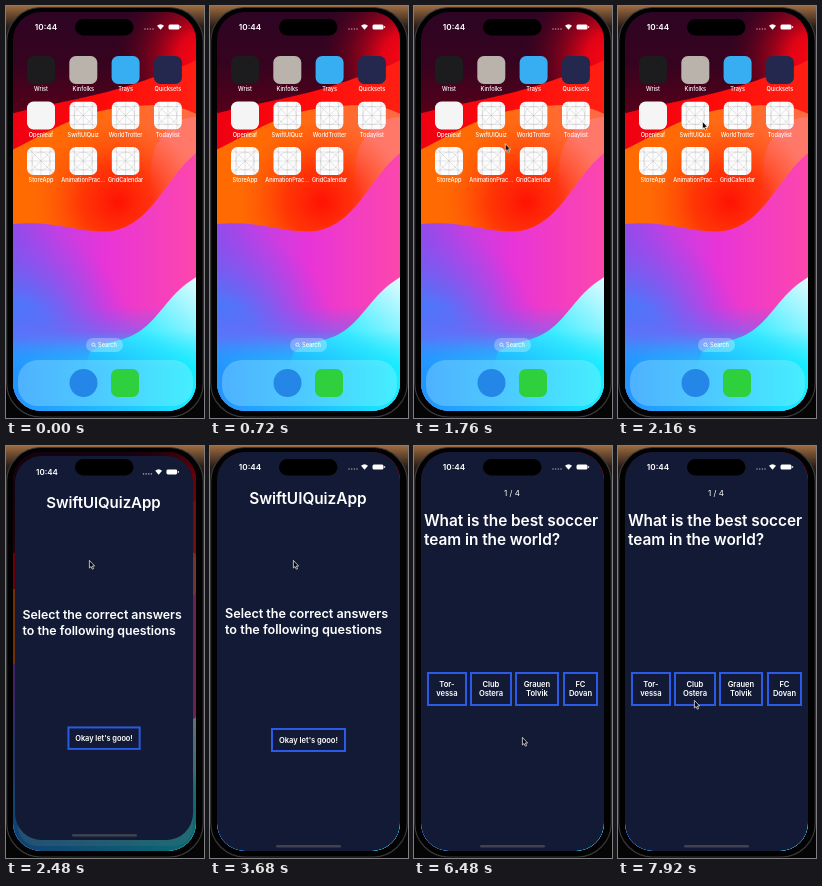
Write an HTML page that moves like this. It is 198 px wide and 412 px high and loops after 8 s.

```html
<!DOCTYPE html>
<html lang="en">
<head>
<meta charset="utf-8">
<title>Quiz app demo</title>
<style>
  html, body { margin: 0; width: 100%; height: 100%; overflow: hidden; background: #050506; }
  .stage { position: relative; width: 198px; height: 412px; overflow: hidden; }
  .stage svg, .stage div { position: absolute; left: 0; top: 0; width: 198px; height: 412px; }
  .stage svg { display: block; overflow: visible; }
  text { font-family: Inter, "Open Sans", sans-serif; fill: #fff; }
  .mid { text-anchor: middle; }
  .label { font-size: 5.6px; font-weight: 500; text-anchor: middle; }
  .time { font-size: 8.2px; font-weight: 600; text-anchor: middle; }
  .title { font-size: 15.4px; font-weight: 600; }
  .lead { font-size: 12.7px; font-weight: 600; }
  .action { font-size: 7.6px; font-weight: 600; text-anchor: middle; }
  .box { fill: none; stroke: #2b5be6; stroke-width: 2; }

  .screen { clip-path: inset(6px 8px 7px 7px round 28px); }
  .dim, .app, .content, .bar, .intro, .question, .cursor { animation: 8s linear infinite; }
  .dim { background: #000; opacity: 0; animation-name: dim; }
  .app { background: #131a35; animation-name: open; }
  .content { transform-origin: 0 0; animation-name: settle; }
  .bar { animation-name: bar; }
  .intro { animation-name: leave; }
  .question { background: #131a35; animation-name: enter; }
  .stage .cursor { width: 7px; height: 11px; animation-name: point; }

  @keyframes dim {
    0%, 28% { opacity: 0; }
    30%, 31.5% { opacity: .55; }
    33%, 100% { opacity: 1; }
  }
  @keyframes open {
    0%, 27.99% { opacity: 0; clip-path: inset(95px 107px 289px 63px round 7px); }
    28% { opacity: .2; clip-path: inset(95px 107px 289px 63px round 7px); }
    29% { opacity: 1; clip-path: inset(62px 63px 170px 38px round 18px); }
    30% { opacity: 1; clip-path: inset(26px 25px 62px 17px round 25px); }
    31% { opacity: 1; clip-path: inset(10px 11px 18px 9px round 27px); }
    32% { opacity: 1; clip-path: inset(7px 9px 9px 7.5px round 28px); }
    33%, 100% { opacity: 1; clip-path: inset(6px 8px 7px 7px round 28px); }
  }
  @keyframes settle {
    0%, 28% { transform: translate(62px, 94px) scale(.15); }
    29% { transform: translate(35px, 58px) scale(.51); }
    30% { transform: translate(13px, 21px) scale(.84); }
    31% { transform: translate(2px, 5.5px) scale(.975); }
    32% { transform: translate(.5px, 1.5px) scale(.994); }
    33%, 100% { transform: none; }
  }
  @keyframes bar {
    0%, 28% { transform: translateY(-220px); }
    30% { transform: translateY(-55px); }
    31% { transform: translateY(-11px); }
    32% { transform: translateY(-3px); }
    33%, 100% { transform: none; }
  }
  @keyframes leave {
    0%, 74% { transform: none; animation-timing-function: cubic-bezier(.2, .8, .3, 1); }
    80%, 100% { transform: translateX(-60px); }
  }
  @keyframes enter {
    0%, 74% { transform: translateX(198px); animation-timing-function: cubic-bezier(.2, .8, .3, 1); }
    80%, 100% { transform: none; }
  }
  @keyframes point {
    0%, 12% { transform: translate(200px, 235px); animation-timing-function: ease-out; }
    17%, 19% { transform: translate(95px, 151px); animation-timing-function: ease-in-out; }
    26%, 30% { transform: translate(84px, 115px); }
    31%, 52% { transform: translate(83px, 114px); animation-timing-function: ease-in-out; }
    63%, 65% { transform: translate(120px, 262px); animation-timing-function: ease-in-out; }
    72%, 84% { transform: translate(108px, 291px); animation-timing-function: ease-in-out; }
    97%, 100% { transform: translate(76px, 254px); }
  }
</style>
</head>
<body>
<div class="stage">
  <svg viewBox="0 0 198 412">
    <defs>
      <linearGradient id="desk" x2="0" y2="1">
        <stop offset="0" stop-color="#9a6a40"/><stop offset=".05" stop-color="#2a1e18"/><stop offset=".12" stop-color="#050506"/>
      </linearGradient>
      <linearGradient id="night" x2="0" y2="1">
        <stop offset="0" stop-color="#2c0524"/><stop offset=".14" stop-color="#36031f"/><stop offset=".28" stop-color="#5c0018"/>
      </linearGradient>
      <radialGradient id="glow" gradientUnits="userSpaceOnUse" cx="198" cy="52" r="88">
        <stop offset="0" stop-color="#ff0612"/><stop offset=".3" stop-color="#e00316"/><stop offset="1" stop-color="#60001c" stop-opacity="0"/>
      </radialGradient>
      <linearGradient id="red">
        <stop offset="0" stop-color="#ee0012"/><stop offset=".5" stop-color="#ff0a0a"/><stop offset=".8" stop-color="#ff1a10"/><stop offset="1" stop-color="#ff2012"/>
      </linearGradient>
      <linearGradient id="orange">
        <stop offset="0" stop-color="#ff6a00"/><stop offset=".4" stop-color="#ff6a08"/><stop offset=".7" stop-color="#ff6a2c"/><stop offset="1" stop-color="#ff6a4c"/>
      </linearGradient>
      <radialGradient id="ember" gradientUnits="userSpaceOnUse" cx="112" cy="196" r="82">
        <stop offset="0" stop-color="#ff1204"/><stop offset=".45" stop-color="#ff2a04" stop-opacity=".8"/><stop offset="1" stop-color="#ff4a04" stop-opacity="0"/>
      </radialGradient>
      <linearGradient id="coral" x1="0" y1="1" x2="1" y2="0">
        <stop offset="0" stop-color="#ff3a30"/><stop offset=".5" stop-color="#ff7468"/><stop offset="1" stop-color="#ff7a68"/>
      </linearGradient>
      <linearGradient id="violet">
        <stop offset="0" stop-color="#8c4cec"/><stop offset=".25" stop-color="#c040e4"/><stop offset=".5" stop-color="#e834d8"/><stop offset="1" stop-color="#ff48a8"/>
      </linearGradient>
      <radialGradient id="blue" gradientUnits="userSpaceOnUse" cx="0" cy="345" r="130">
        <stop offset="0" stop-color="#2a86ff"/><stop offset=".4" stop-color="#4a78fa" stop-opacity=".9"/><stop offset="1" stop-color="#8050f0" stop-opacity="0"/>
      </radialGradient>
      <linearGradient id="shore" gradientUnits="userSpaceOnUse" x1="0" y1="300" x2="0" y2="356">
        <stop offset="0" stop-color="#7a5cf4" stop-opacity="0"/><stop offset=".6" stop-color="#6a70f8" stop-opacity=".8"/><stop offset="1" stop-color="#2aa6ff"/>
      </linearGradient>
      <linearGradient id="cyan" gradientUnits="userSpaceOnUse" x1="100" y1="375" x2="190" y2="272">
        <stop offset="0" stop-color="#22c8ff"/><stop offset=".45" stop-color="#3cecff"/><stop offset="1" stop-color="#e0fcff"/>
      </linearGradient>
      <linearGradient id="sea">
        <stop offset="0" stop-color="#2490ff"/><stop offset=".5" stop-color="#20bcff"/><stop offset="1" stop-color="#14f2ff"/>
      </linearGradient>
      <linearGradient id="seaFade" gradientUnits="userSpaceOnUse" x1="0" y1="325" x2="0" y2="362">
        <stop offset="0" stop-color="#000"/><stop offset="1" stop-color="#fff"/>
      </linearGradient>
      <mask id="seaMask"><rect y="320" width="198" height="92" fill="url(#seaFade)"/></mask>
      <symbol id="status" viewBox="0 0 198 412">
        <text class="time" x="40" y="24">10:44</text>
        <g fill="#fff">
          <g opacity=".55"><circle cx="139" cy="23" r=".8"/><circle cx="141.7" cy="23" r=".8"/><circle cx="144.4" cy="23" r=".8"/><circle cx="147" cy="23" r=".8"/></g>
          <path d="M151 19.8Q154.5 16.6 158 19.8L154.5 23.8Z"/>
          <rect x="162.5" y="18.6" width="11" height="5" rx="1.5"/>
          <rect x="174.2" y="20.1" width=".9" height="2" rx=".4"/>
        </g>
      </symbol>
      <symbol id="template" viewBox="0 0 28 28">
        <rect width="28" height="28" rx="6.5" fill="#fcfcfc"/>
        <g fill="none" stroke="#a6a6ae" stroke-width=".4">
          <path d="M5 0V28M14 0V28M23 0V28M0 5H28M0 14H28M0 23H28" opacity=".7"/>
          <path d="M2 2L26 26M26 2L2 26" opacity=".8"/>
          <circle cx="14" cy="14" r="9" opacity=".7"/>
        </g>
      </symbol>
    </defs>
    <rect width="198" height="412" fill="url(#desk)"/>
    <rect x=".7" y="1.5" width="196.6" height="409.5" rx="34" fill="#020203" stroke="#38383b" stroke-width="1.2"/>
  </svg>

  <div class="screen">
    <svg viewBox="0 0 198 412">
      <rect width="198" height="412" fill="url(#night)"/>
      <rect width="198" height="180" fill="url(#glow)"/>
      <path d="M0 109C45 97 90 91 128 78S180 60 198 50V260H0Z" fill="url(#red)"/>
      <path d="M0 147C40 128 70 106 118 101S180 102 198 112V260H0Z" fill="url(#orange)"/>
      <path d="M130 214C152 190 140 160 150 140S175 108 198 112V260H120Z" fill="url(#coral)"/>
      <path d="M0 147C40 128 70 106 118 101S180 102 198 112V260H0Z" fill="url(#ember)"/>
      <path d="M0 219C48 212 70 228 106 225C150 217 160 166 198 141V412H0Z" fill="url(#violet)"/>
      <path d="M0 219C48 212 70 228 106 225C150 217 160 166 198 141V412H0Z" fill="url(#blue)"/>
      <rect y="300" width="198" height="112" fill="url(#shore)"/>
      <path d="M198 267C166 282 158 306 138 322S104 332 84 346L60 412H198Z" fill="url(#cyan)"/>
      <rect y="320" width="198" height="92" fill="url(#sea)" mask="url(#seaMask)"/>
      <use href="#status"/>
      <g id="icons"></g>
      <rect x="80" y="332" width="37" height="14" rx="7" fill="#fff" fill-opacity=".28"/>
      <g fill="none" stroke="#fff" stroke-width=".7"><circle cx="87.4" cy="338.6" r="1.6"/><path d="M88.6 339.8L90 341.2"/></g>
      <text class="label" x="101.5" y="341">Search</text>
      <rect x="12" y="354" width="175" height="46" rx="20" fill="#b4f0ff" fill-opacity=".3"/>
      <circle cx="77.5" cy="377" r="14" fill="#2487e8"/>
      <rect x="105" y="363" width="28" height="28" rx="6.5" fill="#2fd03e"/>
    </svg>
    <div class="dim"></div>
    <div class="app">
      <div class="content">
        <div class="intro">
          <svg viewBox="0 0 198 412">
            <text class="title mid" x="98" y="57.5">SwiftUIQuizApp</text>
            <text class="lead" x="15" y="172">Select the correct answers</text>
            <text class="lead" x="15" y="188">to the following questions</text>
            <rect class="box" x="62" y="283" width="73" height="22"/>
            <text class="action" x="98.5" y="296.8">Okay let's gooo!</text>
          </svg>
        </div>
        <div class="question">
          <svg viewBox="0 0 198 412">
            <text class="mid" x="98" y="50" font-size="8">1 / 4</text>
            <text class="title" x="10" y="80">What is the best soccer</text>
            <text class="title" x="10" y="99">team in the world?</text>
            <g id="answers"></g>
          </svg>
        </div>
        <svg viewBox="0 0 198 412"><use href="#status"/></svg>
      </div>
      <svg class="bar" viewBox="0 0 198 412"><rect x="66" y="399" width="65" height="2.6" rx="1.3" fill="#40434f"/></svg>
    </div>
  </div>

  <svg viewBox="0 0 198 412"><rect x="69" y="13" width="58.5" height="16.5" rx="8.25" fill="#000"/></svg>
  <svg class="cursor" viewBox="0 0 7 11">
    <path d="M.4 .4V8L2.1 6.5L3.3 9.2L4.6 8.6L3.4 6H5.6Z" fill="#000" stroke="#fff" stroke-width=".7"/>
  </svg>
</div>
<script>
  // Apps without a color use the blank template icon.
  const apps = [
    ["Wrist", "#1c1c1f"], ["Kinfolks", "#b9b3ac"], ["Trays", "#38aef2"], ["Quicksets", "#24284f"],
    ["Openleaf", "#f5f5f5"], ["SwiftUIQuiz"], ["WorldTrotter"], ["Todaylist"],
    ["StoreApp"], ["AnimationPrac..."], ["GridCalendar"]
  ];
  const answers = [
    [13, 53, "Tor-", "vessa"], [56, 98, "Club", "Ostera"],
    [101, 145, "Grauen", "Tolvik"], [149, 184, "FC", "Dovan"]
  ];

  document.getElementById("icons").innerHTML = apps.map(([name, color], i) => {
    const x = 21 + (i % 4) * 42.3, y = 50 + Math.floor(i / 4) * 45.5;
    const size = `x="${x}" y="${y}" width="28" height="28"`;
    const icon = color ? `<rect ${size} rx="6.5" fill="${color}"/>` : `<use href="#template" ${size}/>`;
    return `${icon}<text class="label" x="${x + 14}" y="${y + 35}">${name}</text>`;
  }).join("");

  document.getElementById("answers").innerHTML = answers.map(([left, right, top, bottom]) => {
    const x = (left + right) / 2;
    return `<rect class="box" x="${left + 1}" y="227" width="${right - left - 2}" height="32"/>
      <text class="action" x="${x}" y="241">${top}</text>
      <text class="action" x="${x}" y="250.5">${bottom}</text>`;
  }).join("");
</script>
</body>
</html>
```
